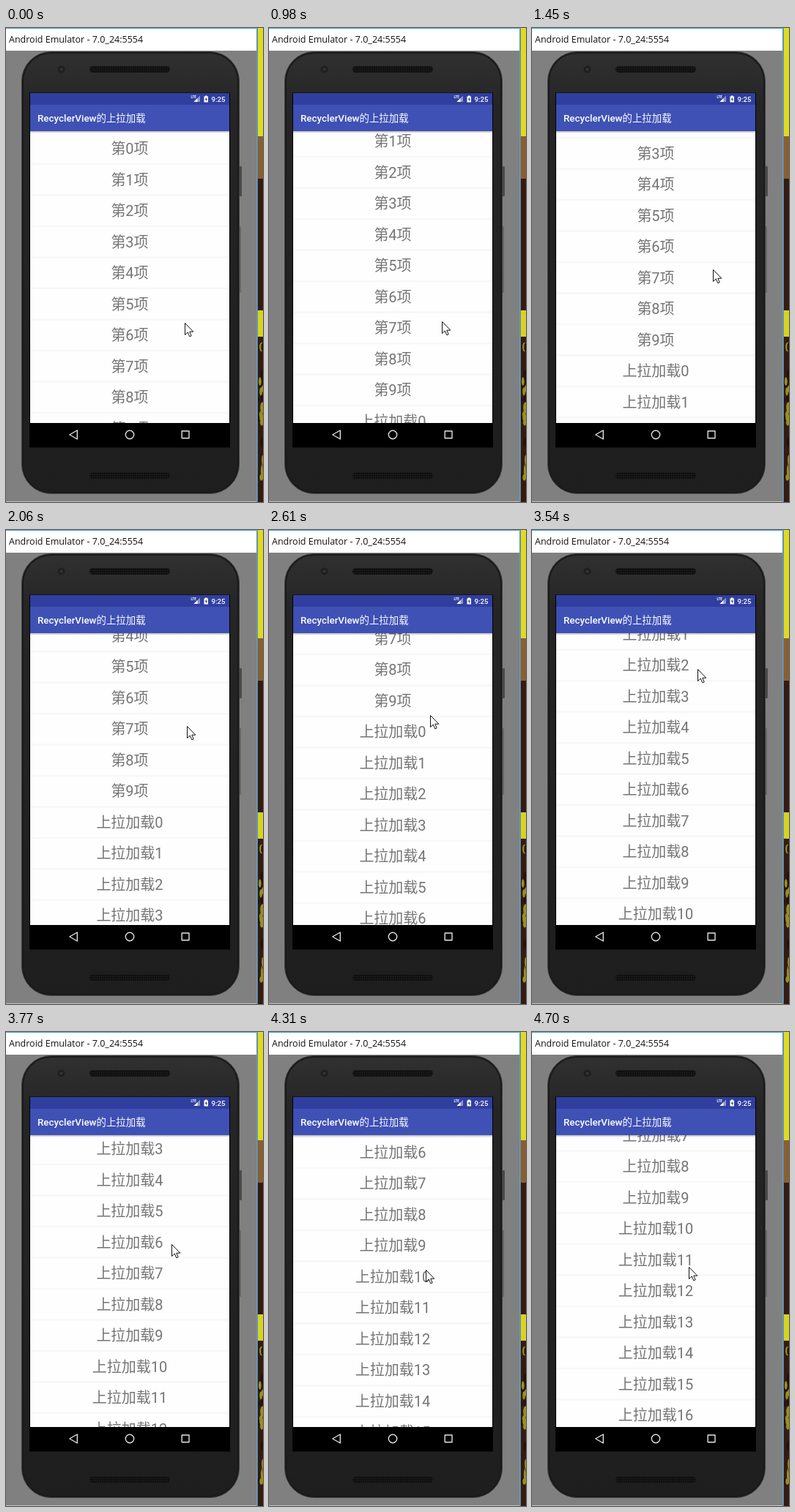
An HTML page that plays this animation: 351x648 px, repeating every 4780 ms.

```html
<!DOCTYPE html>
<html lang="zh-CN">
<head>
<meta charset="utf-8">
<title>RecyclerView</title>
<style>
  html, body { margin: 0; width: 100%; height: 100%; overflow: hidden; background: #808080; }
  svg { display: block; width: 351px; height: 648px; }
  text { font-family: Roboto, "Noto Sans CJK SC", "Noto Sans CJK", sans-serif; }
  .caption { font: 12.5px "Open Sans", "Noto Sans", sans-serif; fill: #111; }
  .title { font-size: 13.4px; font-weight: 500; fill: #fff; }
  .title tspan { font-weight: 400; }
  .clock { font-size: 9.6px; font-weight: 500; fill: #fff; }
  #rows text { font-size: 20px; fill: #757575; text-anchor: middle; }
  #rows rect { fill: #f8f8f8; }
</style>
</head>
<body>
<svg viewBox="0 0 351 648">
  <defs>
    <linearGradient id="body" x2="0" y2="1">
      <stop offset="0" stop-color="#303030"/>
      <stop offset=".12" stop-color="#252525"/>
      <stop offset="1" stop-color="#1e1e1e"/>
    </linearGradient>
    <linearGradient id="shade" x2="0" y2="1">
      <stop offset="0" stop-color="#000" stop-opacity=".28"/>
      <stop offset="1" stop-color="#000" stop-opacity="0"/>
    </linearGradient>
    <pattern id="mesh" width="3" height="3" patternUnits="userSpaceOnUse">
      <rect width="3" height="3" fill="#101010"/>
      <circle cx="1.5" cy="1.5" r=".7" fill="#262626"/>
    </pattern>
    <clipPath id="list"><rect x="33" y="141" width="272" height="399"/></clipPath>
    <clipPath id="edge"><rect x="344" width="7" height="648"/></clipPath>
  </defs>

  <!-- desktop and window -->
  <rect width="351" height="648" fill="#808080"/>
  <g id="wall" clip-path="url(#edge)">
    <rect x="344" width="7" height="648" fill="#351a10"/>
    <rect x="344" width="7" height="148" fill="#dfdb22"/>
    <rect x="344" y="148" width="7" height="58" fill="#8a5f30"/>
    <rect x="344" y="386" width="7" height="36" fill="#d8d320"/>
  </g>
  <rect width="343" height="31" fill="#fff"/>
  <path d="M0 647.5H342" stroke="#c4c4c4"/>
  <path d="M0 .5H342.5V648" fill="none" stroke="#45a5e6"/>
  <text class="caption" x="4" y="20">Android Emulator - 7.0_24:5554</text>

  <!-- phone -->
  <rect x="318" y="189" width="4" height="41" rx="1" fill="#4a4a4a"/>
  <rect x="318" y="271" width="3" height="91" rx="1" fill="#666"/>
  <rect x="21.5" y="32.5" width="297" height="604" rx="40" fill="#1a1a1a" stroke="#3c3c3c"/>
  <rect x="24" y="35" width="292" height="599" rx="37.5" fill="url(#body)"/>
  <circle cx="75.5" cy="56.5" r="5" fill="#1f1f1f"/>
  <circle cx="75.5" cy="56.5" r="2" fill="#353535"/>
  <rect x="114" y="52" width="110" height="9" rx="4.5" fill="url(#mesh)"/>
  <rect x="114" y="607.5" width="110" height="9" rx="4.5" fill="url(#mesh)"/>
  <rect x="32" y="88.5" width="274" height="485" fill="#000"/>

  <!-- list -->
  <rect x="33" y="141" width="272" height="399" fill="#fefefe"/>
  <g id="rows-clip" clip-path="url(#list)"><g id="rows"></g></g>
  <rect x="33" y="141" width="272" height="3" fill="url(#shade)"/>

  <!-- bars -->
  <rect x="33" y="89" width="272" height="16" fill="#303f9f"/>
  <rect x="33" y="105" width="272" height="36" fill="#3f51b5"/>
  <text class="title" x="43" y="128">RecyclerView<tspan>的上拉加载</tspan></text>
  <text x="252.5" y="95.5" font-size="4.5" font-weight="700" fill="#fff">LTE</text>
  <path d="M265 92.5V101H256.5z" fill="#fff" fill-opacity=".45"/>
  <path d="M261.5 96V101H256.5z" fill="#fff"/>
  <path d="M270.5 93.5H272V92.5H274.5V93.5H276V101.5H270.5z" fill="#fff"/>
  <path d="M273.8 94.5L271.7 98H273V100.5L275 97H273.8z" fill="#303f9f"/>
  <text class="clock" x="280.5" y="100.5">9:25</text>
  <g fill="none" stroke="#e2e2e2" stroke-width="1.4" stroke-linejoin="round">
    <path d="M97.3 550V562L86.8 556z"/>
    <circle cx="169" cy="556" r="5.7"/>
    <rect x="240.2" y="551" width="9.8" height="9.8"/>
  </g>

  <path id="mouse" d="M.5 .5V16.5L4.3 13L6.8 18.8L9.2 17.8L6.8 12.2H11.8z" fill="#fff" stroke="#111"/>
</svg>
<script>
const LOOP = 4780, TICK = 77.5, PHASE = 45;
const PITCH = 42.5, ROWS = 30;
const rows = document.getElementById('rows');
const mouse = document.getElementById('mouse');

// Each stroke eases the pointer and the list to new values, then holds them
const rest = { x: 244, y: 403, scroll: 0 };
const strokes = [
  { from: 285, to: 670, x: 228, y: 455 },
  { from: 745, to: 1450, x: 247, y: 330, scroll: 121 },
  { from: 1755, to: 2060, y: 270, scroll: 188 },
  { from: 2060, to: 2290, x: 231, y: 205, scroll: 255 },
  { from: 2290, to: 2930, x: 213, y: 283, scroll: 350 },
  { from: 3005, to: 3540, x: 226, y: 190, scroll: 490 },
  { from: 3540, to: 3770, y: 290, scroll: 557.5 },
  { from: 3770, to: 4080, x: 214, y: 412, scroll: 590 },
  { from: 4080, to: 4310, y: 325, scroll: 679.5 },
  { from: 4310, to: 4700, y: 321, scroll: 746 },
];

const easeOut = f => 1 - (1 - f) ** 1.4;

function poseAt(t) {
  const pose = { ...rest };
  for (const { from, to, ...goal } of strokes) {
    if (t <= from) break;
    const f = easeOut(Math.min(1, (t - from) / (to - from)));
    for (const key in goal) pose[key] += (goal[key] - pose[key]) * f;
  }
  return pose;
}

function add(parent, tag, attrs, label = '') {
  const el = document.createElementNS('http://www.w3.org/2000/svg', tag);
  for (const name in attrs) el.setAttribute(name, attrs[name]);
  el.textContent = label;
  parent.append(el);
}

for (let i = 0; i < ROWS; i++) {
  const y = i * PITCH;
  add(rows, 'text', { x: 169, y: y + 172 }, i < 10 ? `第${i}项` : `上拉加载${i - 10}`);
  add(rows, 'rect', { x: 33, y: y + 184.7, width: 272, height: 2.6 });
}

// Wallpaper speckle
let seed = 7;
const random = () => (seed = seed * 16807 % 2147483647) / 2147483647;
const wall = document.getElementById('wall');
for (let i = 0; i < 22; i++) {
  add(wall, 'ellipse', {
    cx: 344 + random() * 7, cy: 425 + random() * 205,
    rx: 1 + random() * 2.5, ry: 3 + random() * 7,
    fill: i % 3 ? '#9c8f1c' : '#241009',
  });
}

const start = performance.now();
function draw() {
  const now = Math.max(0, performance.now() - start) % LOOP;
  const t = Math.floor((now - PHASE) / TICK) * TICK + PHASE + 5;
  const { x, y, scroll } = poseAt(t);
  rows.setAttribute('transform', `translate(0 ${-scroll})`);
  mouse.setAttribute('transform', `translate(${Math.round(x)} ${Math.round(y)})`);
  requestAnimationFrame(draw);
}
draw();
</script>
</body>
</html>
```
